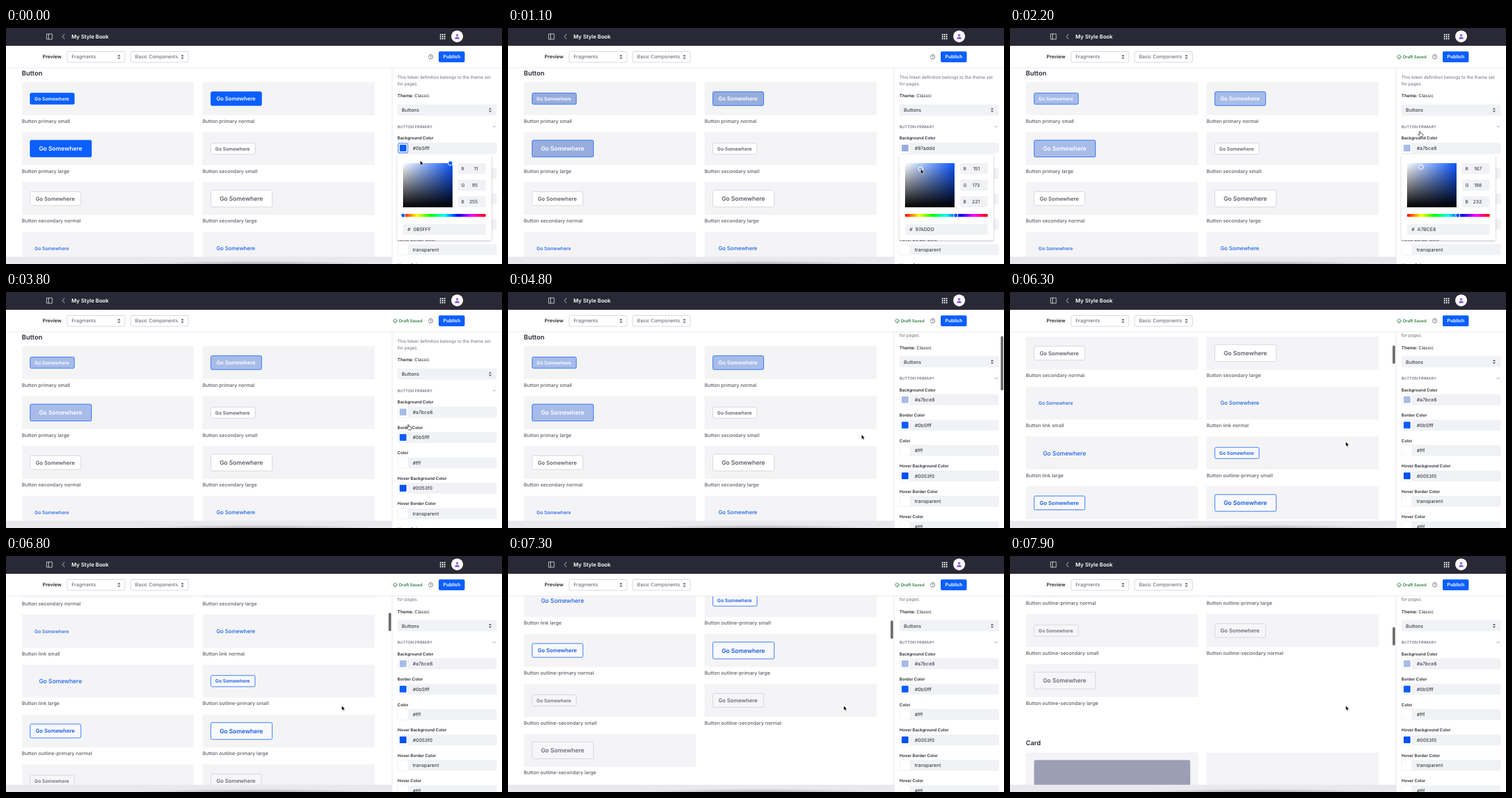
Animation, 752 px wide and 358 px high, one loop 8 s. Source, as an HTML page:

```html
<!DOCTYPE html>
<html lang="en">
<head>
<meta charset="utf-8">
<title>Style book editor</title>
<style>
  html, body { margin: 0; width: 100%; height: 100%; overflow: hidden; background: #fff; }
  svg { display: block; width: 100%; height: 100%; --pick: #0b5fff; }
  text { font-family: Inter, "Open Sans", sans-serif; text-rendering: geometricPrecision; white-space: pre; }
  .pick { fill: var(--pick); }
</style>
</head>
<body>
<svg id="stage" viewBox="0 0 752 358">
  <defs>
    <clipPath id="pageClip"><rect y="61" width="585" height="286"/></clipPath>
    <clipPath id="sideClip"><rect x="585" y="61" width="167" height="297"/></clipPath>
    <linearGradient id="tint"><stop stop-color="#fff"/><stop offset="1" stop-color="#0b57ff"/></linearGradient>
    <linearGradient id="shade" x2="0" y2="1"><stop stop-opacity="0"/><stop offset="1"/></linearGradient>
    <linearGradient id="rainbow"></linearGradient>
    <radialGradient id="dock"><stop stop-color="#555" stop-opacity=".45"/><stop offset="1" stop-color="#555" stop-opacity="0"/></radialGradient>
    <filter id="drop" x="-10%" y="-10%" width="120%" height="120%">
      <feDropShadow dx="0" dy="1" stdDeviation="1.6" flood-color="#272833" flood-opacity=".28"/>
    </filter>
  </defs>
  <rect width="752" height="358" fill="#fff"/>
  <g clip-path="url(#pageClip)">
    <g id="page"></g>
    <rect id="pageBar" x="580" width="4" height="27.5" rx="1.5" fill="#707070"/>
  </g>
  <rect y="347" width="585" height="11" fill="#e9e9ed"/>
  <g clip-path="url(#sideClip)">
    <rect x="585" y="61" width="167" height="297" fill="#fff"/>
    <g id="side"></g>
    <rect id="sideBar" x="747" width="4" height="82" rx="1.5" fill="#707070"/>
  </g>
  <path d="M585.3 60V358M0 60.4H752" stroke="#e4e4ea" stroke-width=".8"/>
  <ellipse cx="380" cy="359" rx="185" ry="6" fill="url(#dock)"/>
  <g id="picker"></g>
  <g id="chrome"></g>
  <path id="arrow" d="M0 0V7.2L1.7 5.7L2.9 8.3L4.1 7.8L3 5.2H5.2Z" fill="#000" stroke="#fff" stroke-width=".6"/>
  <path id="hand" d="M1.2 .6Q2.1 -.2 2.6 .8V3.2L6 3.9Q7 4.3 6.7 5.7L6 8.6H2.6L-.5 5.2Q-.4 4.2 .6 4.6L1.2 5.1Z"
        fill="#fff" stroke="#222" stroke-width=".75" stroke-linejoin="round"/>
</svg>
<script>
const $ = id => document.getElementById(id);
const BLUE = '#0b5fff', GREY = '#5d5e69', INK = '#272833', FIELD = '#f1f2f5', LINE = '#cdced9';

// y is the middle of the capitals
const text = (x, y, str, size = 7.35, fill = INK, weight = 400, extra = '') =>
  `<text x="${x}" y="${y + size * .36}" font-size="${size}" fill="${fill}" font-weight="${weight}" ${extra}>${str}</text>`;
const rect = (x, y, w, h, fill, extra = '') =>
  `<rect x="${x}" y="${y}" width="${w}" height="${h}" fill="${fill}" ${extra}/>`;
const stroke = (d, color, width = 1) =>
  `<path d="${d}" fill="none" stroke="${color}" stroke-width="${width}" stroke-linecap="round" stroke-linejoin="round"/>`;
const carets = (x, y) =>
  `<path d="M${x - 2.2} ${y - .9}h4.4l-2.2 -2.5zM${x - 2.2} ${y + .9}h4.4l-2.2 2.5z" fill="#5d5e69"/>`;

// Preview page
const SIZES = {
  small: { w: 67, h: 17, pad: 6.7, font: 7.15 },
  normal: { w: 77, h: 21, pad: 8.5, font: 8.05 },
  large: { w: 93, h: 25.5, pad: 13.3, font: 8.95 }
};
const KINDS = {
  'primary': { fill: 'var(--pick)', border: BLUE, ink: '#fff', weight: 600 },
  'secondary': { fill: '#fff', border: LINE, ink: GREY, weight: 600 },
  'link': { fill: 'none', border: 'none', ink: '#1b60e8', weight: 500 },
  'outline-primary': { fill: '#f8f9fc', border: BLUE, ink: '#1459e6', weight: 600 },
  'outline-secondary': { fill: '#f6f6f8', border: LINE, ink: '#6b6c7e', weight: 600 }
};
const PITCH = 75.75, COLS = [24, 298];

function sample(kind, size, x, y) {
  const k = KINDS[kind], s = SIZES[size];
  return rect(x, y, 261, 50, '#f4f4f6') +
    rect(x + 12.6, y + 25 - s.h / 2, s.w, s.h, k.fill, `rx="2" stroke="${k.border}" stroke-width=".8"`) +
    text(x + 12.6 + s.pad, y + 25.1, 'Go Somewhere', s.font, k.ink, k.weight) +
    text(x, y + 59, `Button ${kind} ${size}`, 7.4, GREY, 500);
}

function buildPage() {
  let out = text(24, 68, 'Button', 9.8, INK, 600), n = 0;
  for (const kind in KINDS) for (const size in SIZES) {
    out += sample(kind, size, COLS[n % 2], 82.2 + PITCH * (n >> 1));
    n++;
  }
  out += text(24, 731.5, 'Card', 9.8, INK, 600);
  for (const x of COLS) out += rect(x, 746.7, 261, 140, '#f4f4f6');
  return out + rect(36.5, 758, 236.8, 120, '#9b9eb5', 'rx="2.5"');
}

// Token sidebar
const TOKENS = [
  ['Background Color', '', 'var(--pick)'], ['Border Color', '#0b5fff', BLUE], ['Color', '#fff', '#fff'],
  ['Hover Background Color', '#0053f0', '#0053f0'], ['Hover Border Color', 'transparent', '#fff'], ['Hover Color', '#fff', '#fff']
];

function buildSide() {
  let out = text(593.5, 74.2, 'This token definition belongs to the theme set', 6.55, '#6b6c7e') +
    text(593.5, 84.7, 'for pages.', 6.55, '#6b6c7e') +
    text(593.5, 103, 'Theme: <tspan font-weight="400">Classic</tspan>', 6.65, INK, 600) +
    rect(593.5, 116, 150.5, 17, FIELD, 'rx="2"') + text(600, 124.6, 'Buttons') + carets(734, 124.5) +
    text(593.5, 149.7, 'BUTTON PRIMARY', 5.9, '#6b6c7e', 500) + stroke('M738.4 148.8l1.8 1.8 1.8 -1.8', '#6b6c7e', .7);
  TOKENS.forEach(([label, value, color], i) => {
    const y = 182 + 38.5 * i;
    out += text(593.5, y - 14.8, label, 6.3, INK, 600) +
      rect(593.8, y - 8, 150.2, 16.4, FIELD, 'rx="2"') +
      rect(593.8, y - 8, 16, 16.4, '#fff', 'rx="2" stroke="#ededf1" stroke-width=".7"') +
      rect(596.8, y - 5, 10.3, 10.3, color, 'rx=".8"') +
      text(616.7, y + .1, value, 7.3, INK, 400, i ? '' : 'id="value"');
  });
  return out + rect(594.6, 174.8, 14.6, 14.6, 'none', `id="focus" rx="2" stroke="#5a8dfa" stroke-width="1.2"`);
}

// Colour picker
const AREA = { x: 602, y: 205, w: 75, h: 67 };

function buildPicker() {
  const box = `${AREA.x}" y="${AREA.y}" width="${AREA.w}" height="${AREA.h}`;
  let out = rect(593.5, 192, 142.5, 130, '#fff', 'rx="2" filter="url(#drop)"') +
    `<rect x="${box}" fill="url(#tint)"/><rect x="${box}" fill="url(#shade)"/>`;
  ['R', 'G', 'B'].forEach((c, i) => {
    const y = 213.2 + 25.2 * i;
    out += rect(685.5, y - 8.3, 42, 16.6, FIELD, 'rx="2"') + text(690.2, y, c, 7) +
      text(715.3, y, '', 7.2, INK, 400, `id="ch${i}" text-anchor="end"`);
  });
  const knob = id => `<circle id="${id}" class="pick" r="3.4" stroke="#fff" stroke-width="1.1"/>`;
  return out + rect(602, 282, 125.5, 4.4, 'url(#rainbow)', 'rx="1.5"') +
    rect(602, 297.6, 125.5, 16.4, FIELD, 'rx="2"') + text(608.8, 305.6, '#', 7.2) +
    text(617.6, 305.6, '', 7.3, INK, 400, 'id="hex"') + knob('knob') + 
    `<circle id="hueKnob" cy="284.2" r="3.2" fill="#1a55f0" stroke="#fff" stroke-width="1"/>`;
}

// Header and toolbar
function buildChrome() {
  const select = (x, label) => rect(x, 35.5, 87.5, 16.5, '#fff', `rx="2" stroke="${LINE}" stroke-width=".8"`) +
    text(x + 6.8, 43.8, label, 7.35, GREY) + carets(x + 78.5, 43.8);
  let dots = '';
  for (let i = 0; i < 9; i++) dots += rect(657.8 + 3.1 * (i % 3), 9 + 3.1 * (i / 3 | 0), 2.1, 2.1, '#d5d6de');
  return rect(0, 0, 752, 27, '#282934') + rect(0, 27, 752, 33, '#fff') +
    stroke('M62 9h8v8h-8zM64.6 9v8', '#d5d6de', .9) + stroke('M88.7 9.6L85.2 13L88.7 16.4', '#d5d6de', .9) +
    text(99.3, 13.1, 'My Style Book', 8.15, '#fff', 600) + dots +
    '<circle cx="684" cy="12.7" r="9" fill="#fff"/><circle cx="684" cy="11" r="1.8" fill="#8a55d7"/>' +
    '<path d="M680.5 16.8q0 -3.2 3.5 -3.2t3.5 3.2z" fill="#8a55d7"/>' +
    text(55.5, 43.8, 'Preview', 7.35, INK, 600) + select(92.7, 'Fragments') + select(188.9, 'Basic Components') +
    '<g id="saved">' + stroke('M592.9 43.3a2.9 2.9 0 1 1 -1.3 -1.8M589 44l1.2 1.3 2.8 -3', '#287d3c', .8) +
    text(595.8, 44.2, 'Draft Saved', 6.3, '#287d3c', 600) + '</g>' +
    '<circle cx="644" cy="43.7" r="3.3" fill="none" stroke="#5d5e69" stroke-width=".8"/>' +
    stroke('M644 41.8v2.1h.9', '#5d5e69', .8) +
    rect(656, 35.5, 39.5, 16.5, BLUE, 'rx="2"') + text(675.8, 43.8, 'Publish', 7.35, '#fff', 600, 'text-anchor="middle"');
}

$('page').innerHTML = buildPage();
$('side').innerHTML = buildSide();
$('picker').innerHTML = buildPicker();
$('chrome').innerHTML = buildChrome();
$('rainbow').innerHTML = [0, 1, 2, 3, 4, 5, 6].map(i => `<stop offset="${i / 6}" stop-color="hsl(${i * 60} 100% 50%)"/>`).join('');

// Motion: [time, values...]
const POINTER = [
  [0, 628, 201], [200, 629, 205.5], [600, 636, 221], [1000, 628, 216], [1400, 619, 208], [1800, 623.01, 211.04],
  [2100, 623.01, 211.04], [2200, 619.5, 156.5], [3000, 620, 147], [3500, 620, 147], [3600, 618, 160], [3800, 608, 200.7],
  [4600, 608, 200.7], [4800, 536, 216.3], [5300, 509, 227]
];
const PAGE_SCROLL = [
  [5000, 0], [5400, 30], [5800, 72], [6100, 118], [6400, 190], [6500, 190], [6800, 220.5], [7200, 320], [7500, 388], [7900, 448.5]
];
const SIDE_SCROLL = [[4100, 0], [4500, 18.7]];
const PRESS = 200, RELEASE = 1800, CLOSE = 3100;

function track(keys, t) {
  const i = keys.findIndex(k => k[0] > t);
  if (i === 0) return keys[0].slice(1);
  if (i < 0) return keys[keys.length - 1].slice(1);
  const a = keys[i - 1], b = keys[i], p = (t - a[0]) / (b[0] - a[0]);
  return a.slice(1).map((v, n) => v + (b[n + 1] - v) * p);
}

function hsvToRgb(h, s, v) {
  const channel = n => {
    const k = (n + h / 60) % 6;
    return Math.round(255 * v * (1 - s * Math.max(0, Math.min(k, 4 - k, 1))));
  };
  return [channel(5), channel(3), channel(1)];
}

const show = (id, on) => $(id).setAttribute('visibility', on ? 'visible' : 'hidden');
const move = (id, x, y) => $(id).setAttribute('transform', `translate(${x} ${y})`);

function paintColor(t) {
  let hue = 219.34, s = .95686, v = 1;
  if (t >= PRESS) {
    const [x, y] = track(POINTER, Math.min(t, RELEASE));
    hue = 220.615;
    s = (x - AREA.x) / AREA.w;
    v = 1 - (y - AREA.y) / AREA.h;
  }
  const rgb = hsvToRgb(hue, s, v);
  const hex = rgb.map(c => c.toString(16).padStart(2, '0')).join('');
  $('stage').style.setProperty('--pick', '#' + hex);
  $('value').textContent = '#' + hex;
  $('hex').textContent = hex.toUpperCase();
  rgb.forEach((c, i) => $('ch' + i).textContent = c);
  move('knob', AREA.x + AREA.w * s, AREA.y + AREA.h * (1 - v));
  move('hueKnob', t < PRESS ? 602 : 678.8, 0);
}

function render(now) {
  const t = Math.floor(now % 8000 / 100) * 100;
  const [scroll] = track(PAGE_SCROLL, t), [sideScroll] = track(SIDE_SCROLL, t), [x, y] = track(POINTER, t);
  paintColor(t);
  move('page', 0, -scroll);
  move('side', 0, -sideScroll);
  move('pageBar', 0, 65.4 + scroll * .095);
  move('sideBar', 0, 62 + sideScroll * .27);
  move('arrow', x, y);
  move('hand', x, y);
  const pointing = t >= 2200 && t < 4700;
  show('hand', pointing);
  show('arrow', !pointing);
  show('focus', t < PRESS);
  show('picker', t < CLOSE);
  show('saved', t >= 1200);
  show('sideBar', t >= 4200 && t < 5300);
  show('pageBar', t >= 5100);
}

function loop() {
  render(performance.now());
  requestAnimationFrame(loop);
}
loop();
</script>
</body>
</html>
```
